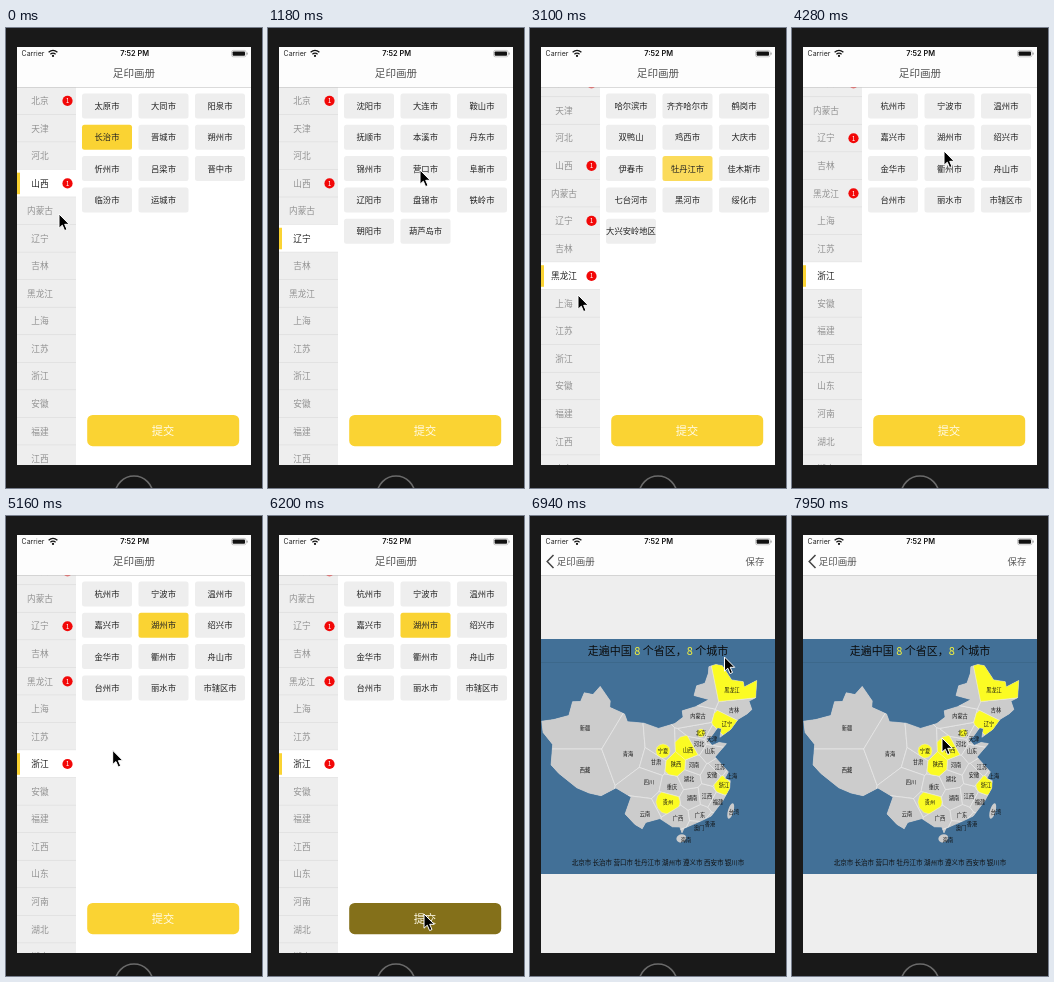
Recreate the animation shown at these times as an HTML page. Size 256x460 px, loop 8000 ms.

```html
<!DOCTYPE html>
<html lang="zh-CN">
<head>
<meta charset="utf-8">
<style>
html, body { margin: 0; width: 100%; height: 100%; overflow: hidden; background: #191919; }
svg { display: block; width: 100vw; height: 100vh; font-family: "Noto Sans CJK SC", "Noto Sans CJK", sans-serif; }
.latin { font-family: Inter, Roboto, sans-serif; }
.medium { font-weight: 500; }
</style>
</head>
<body>
<svg id="stage" viewBox="0 0 256 460"></svg>
<script>
const LOOP = 8000, STEP = 147.2;
const YELLOW = '#fad333', ROW = 27.55, TOP = 59, MIDDLE = 248;
const TITLE = '足印画册';

const provinces = '北京 天津 河北 山西 内蒙古 辽宁 吉林 黑龙江 上海 江苏 浙江 安徽 福建 江西 山东 河南 湖北 湖南'.split(' ');

// from: tick the province is opened, on: tick its city and badge light up
const visits = [
  { row: 3, from: 0, on: -9, pick: 3, cities: '太原市 大同市 阳泉市 长治市 晋城市 朔州市 忻州市 吕梁市 晋中市 临汾市 运城市' },
  { row: 5, from: 3, on: 10, pick: 7, cities: '沈阳市 大连市 鞍山市 抚顺市 本溪市 丹东市 锦州市 营口市 阜新市 辽阳市 盘锦市 铁岭市 朝阳市 葫芦岛市' },
  { row: 7, from: 14, on: 19, pick: 7, cities: '哈尔滨市 齐齐哈尔市 鹤岗市 双鸭山 鸡西市 大庆市 伊春市 牡丹江市 佳木斯市 七台河市 黑河市 绥化市 大兴安岭地区' },
  { row: 10, from: 26, on: 32, pick: 4, cities: '杭州市 宁波市 温州市 嘉兴市 湖州市 绍兴市 金华市 衢州市 舟山市 台州市 丽水市 市辖区市' }
];

// Pointer stops: tick, x, y
const stops = [
  [0, 53, 186], [3, 46, 210], [8, 152, 142], [10, 152, 142], [14, 40, 259], [15, 41, 258],
  [18, 152, 139], [21, 48, 267], [26, 29, 331], [29, 152, 123], [33, 152, 123], [36, 84, 290],
  [38, 184, 411], [39, 156, 398], [42, 156, 398], [44, 100, 381], [48, 226, 61], [50, 226, 61],
  [53, 152, 240], [55, 148, 204]
];

// Border in degrees east and north, from the northern tip clockwise
const border = '121.3,53.3 123.6,53.5 125.6,53 127.5,49.8 130.8,48.9 130.7,47.8 134.8,48.4 133.1,45.1 131,44.8 ' +
  '131.2,43 129.7,42.4 126.9,41.7 124.4,40 121.2,38.8 122,40.5 121,40.8 119,39.2 117.7,38.8 118.9,37.4 120.8,37.8 122.6,37.3 ' +
  '119.2,35 120.9,32.9 121.9,31.6 120.8,30.4 122,29.8 121.6,28.3 119.6,26 116.6,23.2 114.2,22.4 110.5,21.2 110,20.3 ' +
  '109.6,21.5 108,21.6 105.3,23.3 102.2,22.5 101.5,21.2 99.9,22 97.6,24 98.7,27.5 95,29.1 91.8,27.2 ' +
  '89,27.4 86,28 81.2,30.1 78.9,31.4 78,35.5 74.8,37.3 73.6,39.4 76.5,40.4 80.2,42 80.3,44.9 82.5,45.3 ' +
  '83,47.2 85.6,47.2 87.3,49.1 90.9,46.5 91,45.2 95.4,44.2 96.4,42.7 101,42.6 105,41.6 109.5,42.5 111.9,43.7 ' +
  '111.8,45 115.7,45.6 119.8,46.7 115.6,47.9 116.7,49.8 119.3,50.1 120.8,52';

// Province centres; a third number marks a visited one and limits how far it spreads.
// The nameless one stands for the north-eastern arm of 内蒙古.
const sites = ('新疆 55 212,西藏 55 254,青海 98 238,甘肃 126 246,四川 119 266,云南 115 298,重庆 142 271,贵州 138 286 12,' +
  '广西 148 302,广东 170 299,海南 156 324,湖南 162 282,湖北 159 263,江西 177 280,福建 188 286,浙江 194 269 10,' +
  '安徽 182 259,江苏 190 251,上海 202 260,河南 164 249,陕西 146 248 13,宁夏 133 235 7,山西 158 234 15,河北 169 228,' +
  '山东 180 235,北京 171 217 4,天津 182 223,内蒙古 168 200,辽宁 197 208 17,吉林 204 194,黑龙江 202 174 40,' +
  '台湾 204 296,香港 180 308,澳门 169 312, 172 180').split(',').map(s => {
  const [name, ...nums] = s.split(' ');
  const [x, y, reach] = nums.map(Number);
  return { name, x, y, reach };
});

const lerp = (a, b, k) => a + (b - a) * k;
const clamp = k => Math.max(0, Math.min(1, k));
const ease = k => k < .5 ? 4 * k ** 3 : 1 - 4 * (1 - k) ** 3;

const rect = (x, y, w, h, fill, extra = '') =>
  `<rect x="${x}" y="${y}" width="${w}" height="${h}" fill="${fill}" ${extra}/>`;
const path = (d, fill, stroke = 'none', width = 1) =>
  `<path d="${d}" fill="${fill}" stroke="${stroke}" stroke-width="${width}"/>`;
const text = (x, y, size, str, fill, extra = '') =>
  `<text x="${x}" y="${y + size * .37}" font-size="${size}" fill="${fill}" text-anchor="middle" ${extra}>${str}</text>`;
const group = (x, body) => `<g transform="translate(${x})">${body}</g>`;
const outline = points => 'M' + points.map(p => p.map(v => v.toFixed(1))).join(' ') + 'z';

// Conic map projection around 105 degrees east
function project([lon, lat]) {
  const radius = 403 - 4.93 * (lat - 36), angle = .56 * (lon - 105) * Math.PI / 180;
  return [128.5 + radius * Math.sin(angle), radius * Math.cos(angle) - 163];
}

function island(lon, lat, rx, ry, turn) {
  const [x, y] = project([lon, lat]);
  return `<ellipse cx="${x}" cy="${y}" rx="${rx}" ry="${ry}" fill="#ccc" transform="rotate(${turn} ${x} ${y})"/>`;
}

// The area nearer to this site than to any other
function cell(site, reach) {
  let poly = Array.from({ length: 12 }, (_, k) =>
    [site.x + reach * Math.cos(k * Math.PI / 6), site.y + reach * Math.sin(k * Math.PI / 6)]);
  for (const other of sites) {
    if (other === site) continue;
    const side = ([x, y]) => (x - (site.x + other.x) / 2) * (other.x - site.x) +
      (y - (site.y + other.y) / 2) * (other.y - site.y);
    poly = poly.flatMap((p, k) => {
      const q = poly[(k + 1) % poly.length], a = side(p), b = side(q);
      const kept = a <= 0 ? [p] : [];
      if (a * b < 0) kept.push(p.map((v, j) => lerp(v, q[j], a / (a - b))));
      return kept;
    });
  }
  return outline(poly);
}

function chinaMap() {
  const land = outline(border.split(' ').map(p => project(p.split(',').map(Number))));
  const cells = sites.map(s => path(cell(s, 90), '#ccc', '#ececec', .6)).join('');
  const visited = sites.filter(s => s.reach).map(s => path(cell(s, s.reach), '#fbfb23', '#f4f4c0', .4)).join('');
  return `<clipPath id="land">${path(land, '#000')}</clipPath>` + path(land, '#ccc', '#ddd', .6) +
    `<g clip-path="url(#land)">${cells}${visited}</g>` +
    island(121, 23.7, 2.8, 8, 16) + island(109.8, 19.2, 5, 4, -20) +
    sites.map(s => text(s.x, s.y, 5.2, s.name, '#111', 'class="medium"')).join('');
}

const scrollFor = row => Math.max(0, TOP + (row + .5) * ROW - MIDDLE);

function sidebar(n, current) {
  const visit = visits[current];
  const before = current ? scrollFor(visits[current - 1].row) : 0;
  const scroll = lerp(before, scrollFor(visit.row), ease(clamp((n - visit.from - .5) / 2.5)));
  let out = rect(11, TOP, 59, 378, '#eee');
  provinces.forEach((name, i) => {
    const y = TOP + i * ROW - scroll, mid = y + ROW / 2, open = i === visit.row;
    if (open) out += rect(11, y, 59, ROW, '#fff') + rect(11, y + 3, 3, ROW - 6, YELLOW);
    out += rect(11, y + ROW - .5, 59, .6, '#dadada');
    out += text(34, mid, 8.7, name, open ? '#222' : '#929292');
    if (i === 0 || visits.some(v => v.row === i && n >= v.on))
      out += `<circle cx="61.5" cy="${mid}" r="5.1" fill="#f20808"/>` + text(61.5, mid, 6.6, '1', '#fff');
  });
  return out;
}

function cityGrid(n, visit) {
  return visit.cities.split(' ').map((name, i) => {
    const x = 76 + i % 3 * 56.5, y = 65.5 + Math.floor(i / 3) * 31.3;
    const lit = i === visit.pick && n >= visit.on;
    const alpha = lit ? Math.min(1, .4 + .2 * (n - visit.on)) : 1;
    return rect(x, y, 50, 25, lit ? YELLOW : '#eee', `rx="2.5" opacity="${alpha}"`) +
      text(x + 25, y + 12.5, 8.3, name, '#222', 'class="medium"');
  }).join('');
}

function pickerPage(n) {
  const current = visits.findLastIndex(v => n >= v.from);
  return rect(11, TOP, 234, 378, '#fff') + sidebar(n, current) + cityGrid(n, visits[current]) +
    rect(81.2, 387, 152, 31.2, n === 42 ? '#84701a' : YELLOW, 'rx="5.5"') +
    text(157, 402.5, 11.2, '提交', '#fffbe8');
}

function mapPage() {
  const count = '<tspan fill="#f8f53a">8</tspan>';
  return rect(11, TOP, 234, 378, '#eee') + rect(11, 123, 234, 235, '#427097') +
    rect(11, 146, 234, .6, '#3a6384') +
    text(128, 134.5, 11, `走遍中国 ${count} 个省区，${count} 个城市`, '#0c0c0c') + chinaMap() +
    text(128, 346.5, 6.5, '北京市 长治市 营口市 牡丹江市 湖州市 遵义市 西安市 银川市', '#111');
}

function header(p) {
  return rect(11, 19, 234, 40, '#fdfdfd') + rect(11, 59, 234, .6, '#c4c4c4') +
    text(27, 25.5, 7, 'Carrier', '#222', 'class="latin"') +
    path('M42.6,24.3Q47,20.6 51.4,24.3M44.4,26.2Q47,24.1 49.6,26.2', 'none', '#111', 1.3) +
    '<circle cx="47" cy="27.9" r="1.1" fill="#111"/>' +
    text(128.7, 25.5, 7.4, '7:52 PM', '#111', 'class="latin" font-weight="600"') +
    rect(225.6, 22.4, 14.4, 6.4, '#fdfdfd', 'rx="1.6" stroke="#999" stroke-width=".5"') +
    rect(226.6, 23.4, 12.4, 4.4, '#111', 'rx=".8"') + rect(240.6, 24.6, .9, 2, '#777') +
    text(lerp(128, 45.7, p), 45.5, lerp(10.6, 9.5, p), TITLE, '#555') +
    `<g opacity="${p}">` + path('M23.5,39 17.2,45.5 23.5,52', 'none', '#444', 1.5) +
    text(225, 45.5, 9.4, '保存', '#5a5a5a') + '</g>';
}

function cursor(n) {
  const i = stops.findIndex(s => s[0] > n);
  const [t0, x0, y0] = stops[i - 1], [t1, x1, y1] = stops[i];
  const k = (n - t0) / (t1 - t0);
  return group(`${lerp(x0, x1, k)} ${lerp(y0, y1, k)}`,
    path('M0,0V14.2L3.3,11.2 5.6,16.6 8,15.5 5.7,10.3H10.2z', '#000', '#fff', 1));
}

function scene(n) {
  const p = 1 - (1 - clamp((n - 42) / 3.66)) ** 3;
  let pages = '';
  if (p < 1) pages += group(-70.2 * p, pickerPage(n));
  if (p > 0) pages += rect(11, TOP, 234, 378, '#000', `opacity="${.09 * p}"`) +
    group(234 * (1 - p), rect(7, TOP, 4, 378, '#000', 'opacity=".07"') + mapPage());
  return '<clipPath id="view"><rect x="11" y="59" width="234" height="378"/></clipPath>' +
    rect(0, 0, 256, 460, '#191919') +
    '<circle cx="128" cy="467" r="19" fill="#151515" stroke="#6a6a6a" stroke-width="1.6"/>' +
    `<g clip-path="url(#view)">${pages}</g>` + header(p) + cursor(n);
}

const stage = document.getElementById('stage');
let shown = -1;
function update(now) {
  const n = Math.floor(now % LOOP / STEP);
  if (n !== shown) stage.innerHTML = scene(shown = n);
}

const start = performance.now();
function tick() {
  update(performance.now() - start);
  requestAnimationFrame(tick);
}
tick();
</script>
</body>
</html>
```
